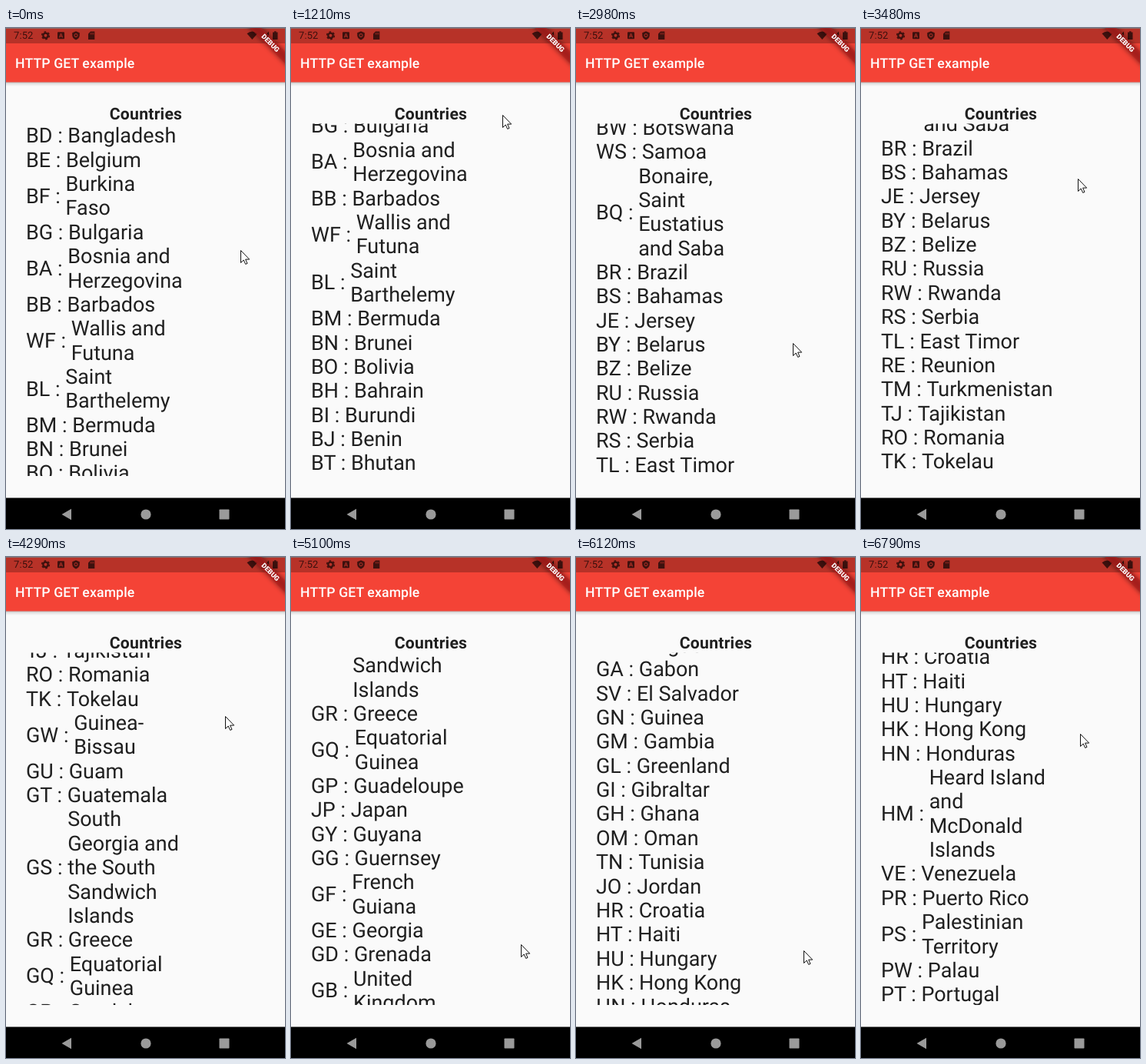
Recreate the animation shown at these times as an HTML page. Size 363x652 px, loop 7200 ms.

```html
<!DOCTYPE html>
<html lang="en">
<head>
<meta charset="utf-8">
<title>Countries list</title>
<style>
  html, body { margin: 0; width: 100%; height: 100%; overflow: hidden; background: #fafafa; }
  svg { display: block; width: 100vw; height: 100vh; }
  text { font-family: Roboto, sans-serif; white-space: pre; text-rendering: geometricPrecision; }
  #list text { font-size: 26.95px; fill: #202020; }
</style>
</head>
<body>
<svg viewBox="0 0 363 652" preserveAspectRatio="none">
  <defs>
    <clipPath id="view"><rect y="124.5" width="363" height="458.5"/></clipPath>
    <linearGradient id="shade" x2="0" y2="1">
      <stop stop-color="#000" stop-opacity=".3"/>
      <stop offset=".4" stop-color="#000" stop-opacity=".1"/>
      <stop offset="1" stop-color="#000" stop-opacity="0"/>
    </linearGradient>
    <filter id="blur" x="-20%" y="-100%" width="140%" height="300%"><feGaussianBlur stdDeviation="3"/></filter>
  </defs>
  <rect width="363" height="652" fill="#fafafa"/>

  <!-- app bar -->
  <rect y="70" width="363" height="6" fill="url(#shade)"/>
  <rect width="363" height="70.5" fill="#f44336"/>
  <text x="12" y="52" font-size="17.65" font-weight="500" letter-spacing=".12" fill="#fff">HTTP GET example</text>

  <!-- status bar -->
  <rect width="363" height="20" fill="#b73228"/>
  <rect width="363" height="1" fill="#8c6a67"/>
  <g fill="#3d110e">
    <text x="10" y="14.3" font-size="13" letter-spacing=".1">7:52</text>
    <circle cx="51.5" cy="9.8" r="3.2" fill="none" stroke="#3d110e" stroke-width="2.4"/>
    <circle cx="51.5" cy="9.8" r="4.9" fill="none" stroke="#3d110e" stroke-width="1.5" stroke-dasharray="2.57 2.57"/>
    <rect x="67" y="5.3" width="9" height="9" rx="1"/>
    <path d="M69.4 12.4 71.5 7.2 73.6 12.4M70.2 10.9H72.8" fill="none" stroke="#b73228"/>
    <path d="M91 4.2 95.8 6.2V9.6C95.8 12.4 93.6 14.6 91 15.4 88.4 14.6 86.2 12.4 86.2 9.6V6.2Z"/>
    <circle cx="91" cy="9.6" r="2" fill="none" stroke="#b73228"/>
    <path d="M110 4.5H115.3V15H107V7.5Z"/>
    <path d="M110.2 6.3V8.5M112 6.3V8.5M113.8 6.3V8.5" stroke="#b73228" stroke-width=".8"/>
    <path d="M313.5 7.2Q320.3 1.8 327.2 7.2L320.3 15Z"/>
    <path d="M342 4.5V15H331.5Z"/>
    <path d="M347 5.5H349V4.3H351.5V5.5H353.5V15H347Z"/>
  </g>
  <g transform="translate(344.3 19.5) rotate(45)">
    <rect x="-40" y="-5.3" width="80" height="10.6" filter="url(#blur)" opacity=".5"/>
    <rect x="-40" y="-5.3" width="80" height="10.6" fill="#b71c1c" fill-opacity=".63"/>
    <text y="3.2" font-size="9" font-weight="900" text-anchor="middle" fill="#fff">DEBUG</text>
  </g>

  <!-- content -->
  <text x="182" y="119" font-size="21.2" font-weight="700" letter-spacing=".22" text-anchor="middle" fill="#202020">Countries</text>
  <g clip-path="url(#view)"><g id="list"></g></g>

  <!-- navigation bar -->
  <rect y="611.5" width="363" height="40.5"/>
  <g fill="#9a9a9a">
    <path d="M72.5 633 85 625.8V640.2Z"/>
    <circle cx="182" cy="633" r="6.6"/>
    <rect x="277.5" y="626.5" width="13" height="13" rx=".8"/>
  </g>

  <path id="cursor" d="M.5.5V16.5L4.2 13 6.7 18.4 9 17.4 6.6 12.1H11.7Z" fill="#fff" stroke="#111" stroke-width="1" stroke-linejoin="round"/>
</svg>
<script>
const LOOP = 7200, FRAME = 130;      // the screen refreshes once per FRAME
const PULL = 400, RETURN = 260;      // pointer: drag up, then go back for the next swipe
const LINE = 31.35, LEFT = 26, FIRST = 149.4;

const countries = `BD:Bangladesh,BE:Belgium,BF:Burkina|Faso,BG:Bulgaria,BA:Bosnia and|Herzegovina,
BB:Barbados,WF:Wallis and|Futuna,BL:Saint|Barthelemy,BM:Bermuda,BN:Brunei,BO:Bolivia,BH:Bahrain,
BI:Burundi,BJ:Benin,BT:Bhutan,JM:Jamaica,BV:Bouvet|Island,BW:Botswana,WS:Samoa,
BQ:Bonaire;|Saint|Eustatius|and Saba,BR:Brazil,BS:Bahamas,JE:Jersey,BY:Belarus,BZ:Belize,RU:Russia,
RW:Rwanda,RS:Serbia,TL:East Timor,RE:Reunion,TM:Turkmenistan,TJ:Tajikistan,RO:Romania,TK:Tokelau,
GW:Guinea-|Bissau,GU:Guam,GT:Guatemala,GS:South|Georgia and|the South|Sandwich|Islands,GR:Greece,
GQ:Equatorial|Guinea,GP:Guadeloupe,JP:Japan,GY:Guyana,GG:Guernsey,GF:French|Guiana,GE:Georgia,
GD:Grenada,GB:United|Kingdom,GA:Gabon,SV:El Salvador,GN:Guinea,GM:Gambia,GL:Greenland,GI:Gibraltar,
GH:Ghana,OM:Oman,TN:Tunisia,JO:Jordan,HR:Croatia,HT:Haiti,HU:Hungary,HK:Hong Kong,HN:Honduras,
HM:Heard Island|and|McDonald|Islands,VE:Venezuela,PR:Puerto Rico,PS:Palestinian|Territory,PW:Palau,
PT:Portugal`.split(/,\s*/);

// Each swipe drags the pointer between two points and lets the list glide to an offset.
const swipes = [
  { at: -80, glide: 1, from: [305, 289], to: [305, 289], offset: 0 },
  { at: 700, glide: 940, from: [281, 408], to: [275, 105], offset: 250.4 },
  { at: 1800, glide: 900, from: [300, 487], to: [303, 195], offset: 635.3 },
  { at: 2840, glide: 910, from: [282, 513], to: [282, 196], offset: 949.7 },
  { at: 3900, glide: 1060, from: [272, 499], to: [285, 200], offset: 1535.3 },
  { at: 5100, glide: 1020, from: [299, 504], to: [296, 190], offset: 2000.4 },
  { at: 6120, glide: 650, from: [296, 512], to: [285, 230], offset: 2330 },
];

const list = document.getElementById('list');
const cursor = document.getElementById('cursor');

const clamp = u => Math.min(1, Math.max(0, u));
const mix = (a, b, k) => a + (b - a) * k;
const mixPoint = (p, q, k) => p.map((v, i) => Math.round(mix(v, q[i], k)));
const slowDown = u => 1 - (1 - u) ** 1.5;
const smooth = u => u * u * (3 - 2 * u);

function addText(x, line, content) {
  const el = document.createElementNS('http://www.w3.org/2000/svg', 'text');
  el.setAttribute('x', x);
  el.setAttribute('y', FIRST + line * LINE);
  el.textContent = content;
  list.append(el);
  return el;
}

function buildList() {
  let line = 0;
  for (const entry of countries) {
    const [code, name] = entry.split(':');
    const parts = name.replace(';', ',').split('|');
    const label = addText(LEFT, line + (parts.length - 1) / 2, code + ' : ');
    const x = LEFT + label.getComputedTextLength();
    for (const part of parts) addText(x, line++, part);
  }
}

function pointerAt(swipe, next, t) {
  const back = next ? clamp((t - next.at + RETURN) / RETURN) : 0;
  if (back > 0) return mixPoint(swipe.to, next.from, smooth(back));
  return mixPoint(swipe.from, swipe.to, clamp((t - swipe.at) / PULL));
}

function draw(time) {
  const now = time % LOOP;
  const i = swipes.filter(s => s.at <= now).length - 1;
  const swipe = swipes[i];
  const t = swipe.at + Math.floor((now - swipe.at) / FRAME) * FRAME;
  const before = i ? swipes[i - 1].offset : 0;
  const offset = mix(before, swipe.offset, slowDown(clamp((t - swipe.at) / swipe.glide)));
  const [x, y] = pointerAt(swipe, swipes[i + 1], t);
  cursor.setAttribute('transform', `translate(${x} ${y})`);
  list.setAttribute('transform', `translate(0 ${-offset})`);
}

buildList();
const start = performance.now();
function loop() {
  draw(performance.now() - start);
  requestAnimationFrame(loop);
}
loop();
</script>
</body>
</html>
```
